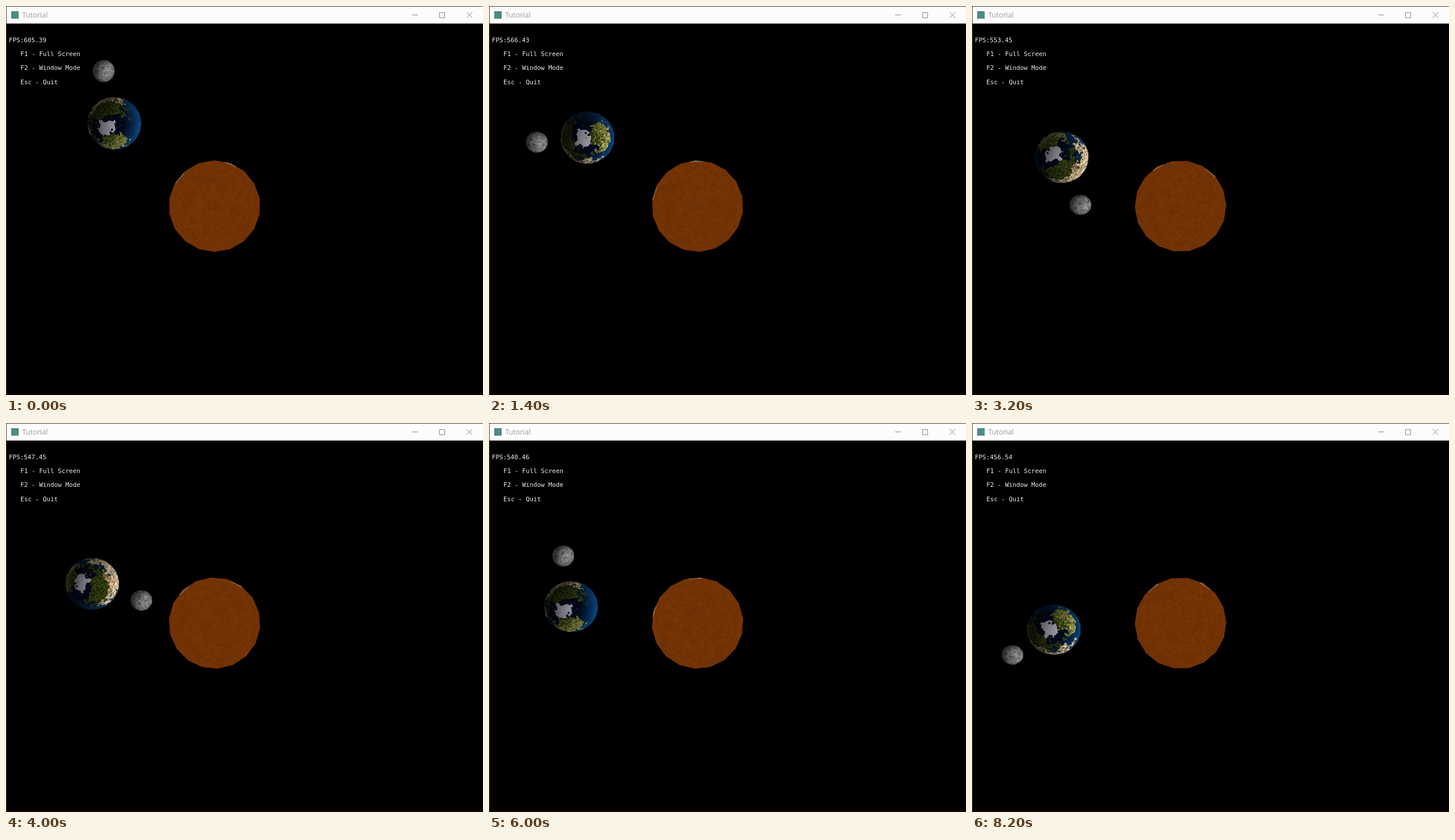
Write an HTML page with a canvas that moves like this. It is 828 px wide and 676 px high and loops after 8300 ms.

```html
<!DOCTYPE html>
<html lang="en">
<head>
<meta charset="utf-8">
<title>Tutorial</title>
<style>
  html, body { margin: 0; width: 100%; height: 100%; overflow: hidden; background: #000; }
  canvas { position: absolute; left: 0; top: 0; }
  .title { position: absolute; left: 28px; top: 6px; font: 12.5px/19px "Open Sans", sans-serif; color: #999; }
  .hud { position: absolute; top: 48px; left: 5px; margin: 0; color: #eee; white-space: pre;
         font: 10.8px/24.2px "DejaVu Sans Mono", monospace; }
  .hud div { padding-left: 20px; }
  .hud div:first-child { padding-left: 0; }
</style>
</head>
<body>
<canvas id="stage" width="828" height="676"></canvas>
<div class="title">Tutorial</div>
<div class="hud"><div id="fps"></div><div>F1 - Full Screen</div><div>F2 - Window Mode</div><div>Esc - Quit</div></div>
<script>
const LOOP = 8300, STEP = 100, RAD = Math.PI / 180;
const ctx = document.getElementById('stage').getContext('2d');
const fpsLabel = document.getElementById('fps');

// Keys in seconds for the planet centre and for the moon around it.
const times = [0, 1.4, 2.3, 4, 5.2, 6.8, 8.2];
const earthX = [188, 171, 163.7, 149.7, 144.5, 141.5, 142.3];
const earthY = [204, 228.7, 244, 279.3, 303, 335, 359];
const moonAngle = [101.5, 185.2, 235.2, 341.2, 411.7, 504, 571.4];
const moonRadius = [93, 88.3, 87.7, 90, 88, 90, 84.4];
const fpsValues = ['605.39', '571.43', '566.43', '553.45', '547.45', '559.88', '540.46', '519.48', '456.54'];

function spline(values, t) {
  const last = times.length - 1;
  let i = 0;
  while (i < last - 1 && t > times[i + 1]) i++;
  const slope = k => {
    const a = Math.max(0, k - 1), b = Math.min(last, k + 1);
    return (values[b] - values[a]) / (times[b] - times[a]);
  };
  const h = times[i + 1] - times[i], u = (t - times[i]) / h, v = 1 - u;
  return v * v * (1 + 2 * u) * values[i] + u * u * (1 + 2 * v) * values[i + 1]
    + h * u * v * (v * slope(i) - u * slope(i + 1));
}

const mix = (a, b, k) => a + (b - a) * k;
const clamp = v => Math.min(1, Math.max(0, v));
const blend = (a, b, k) => a.map((v, i) => mix(v, b[i], clamp(k)));

function hash(x, y, z) {
  let h = Math.imul(x, 374761393) ^ Math.imul(y, 668265263) ^ Math.imul(z, 1274126177);
  h = Math.imul(h ^ (h >>> 13), 1103515245);
  return ((h ^ (h >>> 16)) >>> 0) / 4294967296;
}

function noise(x, y, z) {
  const i = Math.floor(x), j = Math.floor(y), k = Math.floor(z);
  const ease = f => f * f * (3 - 2 * f);
  const u = ease(x - i), v = ease(y - j), w = ease(z - k);
  const row = (b, c) => mix(hash(i, b, c), hash(i + 1, b, c), u);
  const layer = c => mix(row(j, c), row(j + 1, c), v);
  return mix(layer(k), layer(k + 1), w);
}

const at = (p, scale) => noise(p[0] * scale + 20, p[1] * scale + 20, p[2] * scale + 20);

function earthColor(p) {
  const lon = Math.atan2(p[1], p[0]) / RAD;
  const colat = Math.acos(Math.max(-1, Math.min(1, p[2])));
  const rough = (at(p, 5) - 0.5) * 0.8 + (at(p, 12) - 0.5) * 0.9;
  const grain = at(p, 26);
  const land = (centre, width, c, height) => {
    const d = ((lon - centre + 540) % 360) - 180;
    return 1 - Math.hypot(d / width, (colat - c) / height) + rough;
  };
  if (1 - Math.hypot((p[0] + 0.12) / 0.24, (p[1] + 0.02) / 0.33) + rough * 1.3 > 0) return [158, 157, 168];
  if (land(182, 44, 0.86, 0.46) > 0) {
    return blend([38, 52, 10], [215, 200, 120], grain * 1.1 + (colat - 0.95) * 0.8 - 0.15);
  }
  if (land(40, 78, 1.36, 0.46) > 0.1) {
    return blend([78, 64, 28], [255, 228, 190], grain * 1.3 + (colat - 1.2) * 0.8 - 0.1);
  }
  if (land(12, 76, 0.72, 0.46) > 0) return blend([18, 34, 6], [90, 85, 32], grain * 1.4 - 0.4);
  return blend([2, 9, 26], [12, 78, 138], (colat - 0.65) / 1.05 + rough * 0.15);
}

function moonColor(p) {
  const g = 88 + 60 * at(p, 4) + 110 * (at(p, 16) - 0.5);
  return [g, g, g + 2];
}

function sunColor(p) {
  const n = 0.9 + 0.08 * at(p, 7) + 0.18 * (at(p, 36) - 0.5);
  return [122 * n, 54 * n, 5 * n];
}

const sunlight = (x, y, z) => 0.36 + 0.74 * Math.max(0, 0.62 * x + 0.2 * y + 0.72 * z);

function makeBall(size, tiltX, tiltY, color, light) {
  const canvas = document.createElement('canvas');
  canvas.width = canvas.height = size;
  const g = canvas.getContext('2d'), image = g.createImageData(size, size);
  const ca = Math.cos(tiltX), sa = Math.sin(tiltX), cb = Math.cos(tiltY), sb = Math.sin(tiltY);
  return spin => {
    const c = Math.cos(spin), s = Math.sin(spin);
    for (let row = 0; row < size; row++) for (let col = 0; col < size; col++) {
      let x = (col + 0.5) / size * 2 - 1, y = (row + 0.5) / size * 2 - 1;
      const r = Math.hypot(x, y);
      if (r > 1.06) continue;
      if (r > 1) { x /= r; y /= r; }
      const z = Math.sqrt(Math.max(0, 1 - x * x - y * y));
      const x1 = x * ca + z * sa, z1 = z * ca - x * sa;
      const up = z1 * sb - y * cb, z2 = y * sb + z1 * cb;
      const rgb = color([x1 * c + up * s, up * c - x1 * s, z2]);
      const shade = light(x, y, z), o = (row * size + col) * 4;
      for (let k = 0; k < 3; k++) image.data[o + k] = rgb[k] * shade;
      image.data[o + 3] = 255;
    }
    g.putImageData(image, 0, 0);
    return canvas;
  };
}

const earthBall = makeBall(94, 0.31, 0.02, earthColor, sunlight);
const moonBall = makeBall(38, 0.3, 0, moonColor, sunlight);
const sunBall = makeBall(160, 0.02, 0.2, sunColor, () => 1);

function drawBall(picture, x, y, rx, ry, turn, extra) {
  ctx.save();
  ctx.beginPath();
  for (let i = 0; i < 18; i++) {
    const a = turn + i * 20 * RAD;
    ctx.lineTo(x + rx * Math.cos(a), y - ry * Math.sin(a));
  }
  ctx.clip();
  ctx.drawImage(picture, x - rx, y - ry, rx * 2, ry * 2);
  if (extra) extra();
  ctx.restore();
}

// Pale slivers that show only along the upper left rim.
function drawRim(turn) {
  for (let i = 0; i < 5; i++) {
    const deg = (69 + i * 72 + turn) % 360;
    if (deg < 45 || deg > 172) continue;
    ctx.strokeStyle = 'rgba(150,125,105,0.6)';
    ctx.lineWidth = 3;
    ctx.beginPath();
    ctx.arc(362, 348, 78.5, -(deg + 8) * RAD, -(deg - 8) * RAD);
    ctx.stroke();
  }
}

function drawWindow() {
  ctx.fillStyle = '#000';
  ctx.fillRect(0, 0, 828, 676);
  ctx.fillStyle = '#fdfdfd';
  ctx.fillRect(0, 1, 828, 29.5);
  ctx.fillStyle = '#44452a';
  ctx.fillRect(0, 0, 828, 1);
  ctx.fillRect(0, 0, 1, 676);
  ctx.fillStyle = '#0c0305';
  ctx.fillRect(1, 672, 827, 4);
  ctx.fillStyle = '#4f8a85';
  ctx.fillRect(9, 9, 13, 13);
  ctx.strokeStyle = '#858585';
  ctx.lineWidth = 1;
  ctx.beginPath();
  ctx.moveTo(705, 15.5); ctx.lineTo(715, 15.5);
  ctx.rect(752.5, 11.5, 9, 9);
  ctx.moveTo(799.5, 10.5); ctx.lineTo(809.5, 20.5);
  ctx.moveTo(809.5, 10.5); ctx.lineTo(799.5, 20.5);
  ctx.stroke();
}

function draw(ms) {
  const t = ms / 1000;
  const ex = spline(earthX, t), ey = spline(earthY, t);
  const angle = spline(moonAngle, t) * RAD, orbit = spline(moonRadius, t);
  const mx = ex + orbit * Math.cos(angle), my = ey - orbit * Math.sin(angle);
  const sunTurn = 16 * t;

  drawWindow();
  drawBall(sunBall(sunTurn * RAD), 362, 347.7, 79.5, 79.5, (10 + sunTurn) * RAD, () => drawRim(sunTurn));
  drawBall(earthBall(angle), ex, ey, 46.9, 48.7 - 0.0129 * ey, angle);
  drawBall(moonBall(angle), mx, my, 19.1, 20.4 - 0.008 * my, angle);
  fpsLabel.textContent = 'FPS:' + fpsValues[Math.floor((ms + 600) / 1000)];
}

const start = performance.now();
let shown = -1;
function tick() {
  const ms = Math.floor(((performance.now() - start) % LOOP) / STEP) * STEP;
  if (ms !== shown) draw(shown = ms);
  requestAnimationFrame(tick);
}
tick();
</script>
</body>
</html>
```
